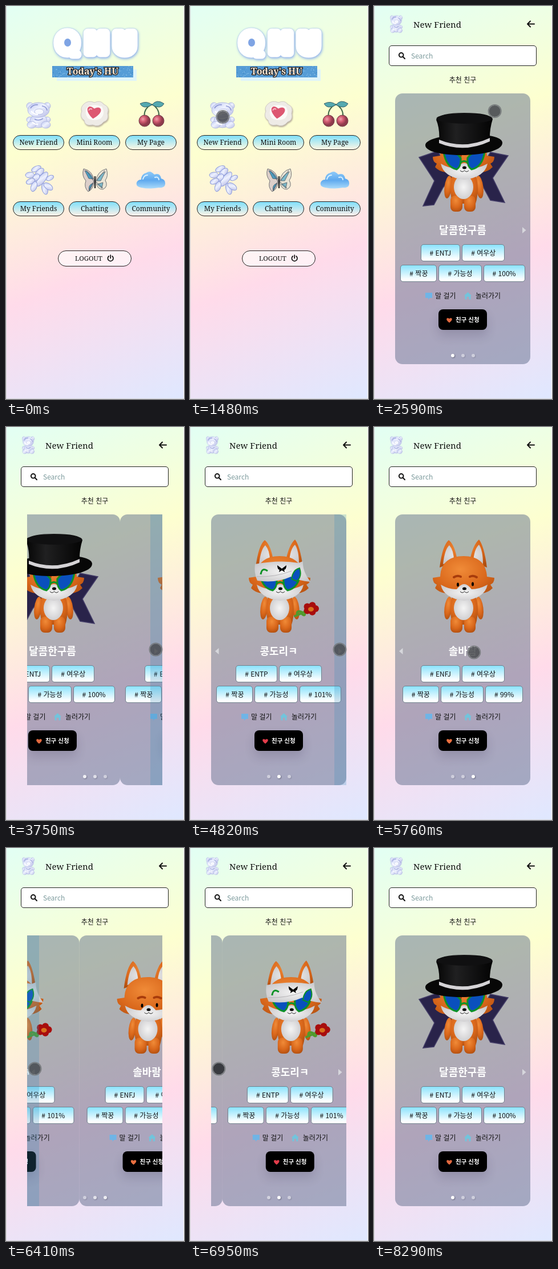
These frames come from a looping animation (312x688 px, 8.62 s). An HTML page:

```html
<!DOCTYPE html>
<html lang="ko">
<head>
<meta charset="utf-8">
<style>
html, body { margin: 0; width: 100%; height: 100%; overflow: hidden; background: #fff; }
body { font: 500 12px 'Noto Sans CJK KR', 'Noto Sans CJK', 'Noto Sans', sans-serif; color: #111; }
#stage { position: absolute; left: 0; top: 0; width: 312px; height: 688px; overflow: hidden;
  background: linear-gradient(160deg, #e2fff4, #fdffd0 33%, #ffdbea 66%, #dfe8ff); }
#frame { position: absolute; inset: 0; box-sizing: border-box; border: solid #d9d9dc; border-width: 0 0 1px 1px; box-shadow: inset -1px 0 #fff; }
#stage div, svg { position: absolute; box-sizing: border-box; }
svg { left: 0; top: 0; width: 312px; height: 688px; }
.slab { font-family: 'Noto Serif', serif; }
.pill { width: 90px; height: 26px; border: 1px solid #222; border-radius: 13px; text-align: center; line-height: 24px;
  background: linear-gradient(#80dffa, rgba(255, 250, 240, .5)); }
#search { left: 26px; top: 69px; width: 259px; height: 36px; border: 1px solid #222; border-radius: 5px; background: #fff;
  padding-left: 38px; line-height: 34px; color: #7d9b9d; font-weight: 400; }
#viewport { left: 37px; top: 153px; width: 237px; height: 474px; overflow: hidden; }
#track { left: 0; top: 0; height: 474px; width: 711px; }
.card { top: 0; width: 237px; height: 474px; border-radius: 13px; background: rgba(97, 110, 140, .5); overflow: hidden; }
.card svg { width: 237px; height: 474px; }
.name { top: 222px; width: 100%; line-height: 32px; text-align: center; font-size: 18px; font-weight: 700; color: #fff; }
#stage .row { left: -20px; width: 277px; display: flex; justify-content: center; gap: 3px; }
.row span { box-sizing: border-box; height: 30px; line-height: 28px; padding: 0 15px; border: 1px solid #71828d; border-radius: 5px;
  background: linear-gradient(#8be3fd, #fff 90%); white-space: nowrap; }
.link { top: 344px; line-height: 20px; font-weight: 400; white-space: nowrap; }
.apply { left: 76px; top: 378px; width: 85px; height: 36px; border-radius: 8px; background: #000; color: #fff;
  padding-left: 30px; line-height: 36px; font-size: 10.5px; font-weight: 800; box-shadow: 0 10px 18px rgba(40, 30, 60, .16); white-space: nowrap; }
.zone { top: 0; width: 21px; height: 474px; background: rgba(60, 140, 185, .25); }
.dot { top: 609px; width: 6px; height: 6px; border-radius: 3px; background: #fff; box-shadow: 1px 1px 2px rgba(40, 40, 60, .5); }
#cursor { width: 24px; height: 24px; margin: -12px; border-radius: 12px; border: 2px solid rgba(115, 118, 120, .85); background: rgba(72, 74, 78, .85); background-clip: padding-box; }
#cursor.pressed { background-color: rgba(45, 47, 52, .9); }
.bubble { font: 900 48px Inter, sans-serif; text-anchor: middle; fill: #fff; stroke: #fff; stroke-width: 15; stroke-linejoin: round;
  filter: drop-shadow(0 0 1px #a9c1ee) drop-shadow(1px 2px 2px #8fb2ec); }
</style>
</head>
<body>
<div id="stage">
  <svg style="width:0;height:0">
    <defs>
      <radialGradient id="fur" cx=".45" cy=".3" r=".75"><stop stop-color="#f08b38"/><stop offset=".6" stop-color="#d9671b"/><stop offset="1" stop-color="#b04f10"/></radialGradient>
      <radialGradient id="white" r=".65"><stop stop-color="#f4f4f4"/><stop offset="1" stop-color="#c6c5c8"/></radialGradient>
      <linearGradient id="glass" x2="1" y2="1"><stop stop-color="#b9c2ee"/><stop offset=".45" stop-color="#eef2ff"/><stop offset="1" stop-color="#b4b8e4"/></linearGradient>
      <linearGradient id="hat" x2="1"><stop stop-color="#050505"/><stop offset=".35" stop-color="#202021"/><stop offset="1" stop-color="#030303"/></linearGradient>
      <linearGradient id="sky" y2="1" x2="0"><stop stop-color="#8fcaf8"/><stop offset=".5" stop-color="#5ea9ee"/><stop offset="1" stop-color="#a9dafb"/></linearGradient>
      <radialGradient id="berry" cx=".35" cy=".35"><stop stop-color="#f1a0ab"/><stop offset=".5" stop-color="#d15a70"/><stop offset="1" stop-color="#8e3a4c"/></radialGradient>
    </defs>
    <g id="bear" fill="url(#glass)" stroke="#a9b1de" stroke-width=".8">
      <circle cx="42" cy="175" r="6"/><circle cx="72" cy="175" r="6"/>
      <ellipse cx="42" cy="199" rx="6" ry="5"/><ellipse cx="72" cy="199" rx="6" ry="5"/>
      <ellipse cx="57" cy="201" rx="15" ry="12"/><ellipse cx="57" cy="182" rx="19" ry="13"/>
      <ellipse cx="45" cy="208" rx="8" ry="6"/><ellipse cx="70" cy="208" rx="8" ry="6"/>
      <ellipse cx="58" cy="185" rx="8" ry="5" fill="#f6f8ff"/>
      <path d="M43 179q4-7 13-6M63 175q8 1 9 8M50 198q7 4 15-1" fill="none" stroke="#8e98d4" stroke-width="1.6"/>
      <path d="M44 184q5 6 12 6M46 203q4 5 10 4" fill="none" stroke="#fff" stroke-width="2"/>
    </g>
    <g id="heart"><path d="M0 4.5C-8 -1 -4.500 -6 0 -2.500C4.500 -6 8 -1 0 4.500Z"/></g>
    <g id="fox">
      <g fill="url(#fur)">
        <path d="M115 246Q120 207 131 198Q142 207 146 234ZM168 234Q173 207 184 197Q193 208 198 246Z"/>
        <ellipse cx="130" cy="317" rx="6.500" ry="20" transform="rotate(7 130 317)"/><ellipse cx="185" cy="317" rx="6.500" ry="20" transform="rotate(-7 185 317)"/>
        <path d="M137 296H178Q186 320 178 346H138Q130 320 137 296Z"/>
        <rect x="134" y="332" width="21" height="28" rx="8"/><rect x="158" y="332" width="20" height="28" rx="8"/>
      </g>
      <ellipse cx="157" cy="317" rx="17" ry="21" fill="url(#white)"/>
      <path d="M121 240Q124 214 132 207Q140 216 140 234ZM174 234Q176 213 184 206Q191 216 191 240Z" fill="url(#white)"/>
      <path d="M157 226C184 226 197 240 198 262L211 264Q211 273 204 276L208 282Q200 290 190 291Q176 303 157 303Q138 303 125 291Q113 289 107 282L110 276Q103 273 103 264L116 262C117 240 130 226 157 226Z" fill="url(#fur)"/>
      <path d="M117 276Q133 285 145 284Q152 275 158 275Q164 275 171 284Q184 284 199 276Q194 300 158 304Q122 300 117 276Z" fill="url(#white)"/>
      <path d="M140 263q6-4 12-1M168 262q6-3 12 1" stroke="#a83c0c" stroke-width="4" stroke-linecap="round" fill="none"/>
      <ellipse cx="147" cy="276" rx="2" ry="3.500"/><ellipse cx="173" cy="275" rx="2" ry="3.500"/>
      <ellipse cx="158.500" cy="283" rx="3.500" ry="2.500"/>
      <path d="M151 288q4 4 7.500 0q4 4 7.500 0" fill="none" stroke="#222"/>
    </g>
    <g id="shades" fill="#0a50bd" stroke="#0c9226" stroke-width="3" stroke-linejoin="round">
      <path d="M122 255Q140 250 152 266Q153 281 145 286Q126 282 122 255ZM194 255Q176 250 164 266Q163 281 171 286Q190 282 194 255Z"/>
      <path d="M152 274q6-5 12 0" fill="none"/>
    </g>
  </svg>

  <div id="home" style="inset:0">
    <svg>
      <text class="bubble" x="108" y="82">Q</text><text class="bubble" x="159" y="82">H</text><text class="bubble" x="208" y="82">U</text>
      <ellipse cx="108" cy="64" rx="6" ry="7" fill="#7fa4e4"/>
      <rect x="89" y="111" width="140" height="20" fill="#dff4fa"/>
      <rect x="81" y="105" width="142" height="20" fill="#559cd6"/>
      <g id="glitter"></g>
      <text x="152" y="120" text-anchor="middle" font-family="Noto Serif, serif" font-weight="900" font-size="16" fill="#f8ead9" stroke="#1d1a1a" stroke-width="2.500" paint-order="stroke">Today's HU</text>
      <use href="#bear"/>
      <g filter="drop-shadow(1px 2px 1px #b9ae9e)">
        <path d="M136 172Q144 164 155 169Q166 164 171 172Q182 176 178 188Q181 200 171 203Q163 213 152 208Q138 211 137 200Q128 194 133 184Q130 178 136 172Z" fill="#eeebe6" stroke="#cfcbc4"/>
        <path d="M142 177Q155 170 168 176Q175 188 166 197Q153 203 143 196Q137 187 142 177Z" fill="#fbfaf7"/>
      </g>
      <use href="#heart" transform="translate(154 186) rotate(8) scale(2.500)" fill="#dd5771"/>
      <path d="M145 183q2-5 6-2" stroke="#f6b3c0" stroke-width="2" fill="none"/>
      <g stroke="#446b4b" stroke-width="2" fill="none"><path d="M256 172Q240 180 243 196M256 172Q270 180 268 196"/></g>
      <path d="M256 173Q247 165 235 171Q241 182 256 173ZM256 173Q264 162 277 171Q271 182 256 173Z" fill="#55a9b0" stroke="#37606a"/>
      <circle cx="243" cy="201" r="10" fill="url(#berry)" stroke="#74404a"/><circle cx="267" cy="201" r="10" fill="url(#berry)" stroke="#74404a"/>
      <g fill="url(#glass)" stroke="#8f9ddb">
        <ellipse cx="63" cy="303" rx="6" ry="15" transform="rotate(38 63 303)"/>
        <ellipse cx="53" cy="285" rx="9" ry="4.500" transform="rotate(-25 53 285)"/><ellipse cx="59" cy="291" rx="9" ry="5" transform="rotate(-40 59 291)"/>
        <ellipse cx="42" cy="296" rx="8" ry="5"/><ellipse cx="53" cy="300" rx="5" ry="7" transform="rotate(40 53 300)"/>
        <ellipse cx="43" cy="307" rx="8" ry="4.500" transform="rotate(-20 43 307)"/><ellipse cx="49" cy="316" rx="5" ry="9" transform="rotate(20 49 316)"/>
        <ellipse cx="68" cy="320" rx="5" ry="10" transform="rotate(-15 68 320)"/><ellipse cx="74" cy="316" rx="9" ry="5" transform="rotate(35 74 316)"/>
        <ellipse cx="77" cy="301" rx="7" ry="4" transform="rotate(-25 77 301)"/>
      </g>
      <g stroke="#52565d" stroke-width=".8">
        <path d="M155 307Q152 288 136 285Q132 297 140 306Q136 317 144 325Q153 321 155 307Z" fill="#dccfca"/>
        <path d="M157 307Q160 289 176 285Q180 298 174 305Q180 316 170 321Q160 322 157 307Z" fill="#e9e4d5"/>
        <path d="M153 303Q148 291 138 288L145 302ZM146 324Q143 313 153 310Z" fill="#4b9ec4"/>
        <path d="M159 306Q163 296 174 290L166 306ZM160 312L170 309L168 319Z" fill="#7cb9ca"/>
        <path d="M141 288L154 307L145 323M173 288L157 307L170 319" fill="none"/>
        <path d="M156 298V319" stroke="#333" stroke-width="2.500"/>
      </g>
      <path d="M237 318Q227 316 229 309Q231 304 237 304Q237 294 246 292Q253 287 260 295Q270 291 272 302Q280 304 279 312Q278 319 268 318Q252 321 237 318Z" fill="url(#sky)"/>
      <path d="M240 303q2-7 8-7M261 300q6-2 7 4" stroke="#d8f0ff" stroke-width="2" fill="none" stroke-linecap="round"/>
    </svg>
    <div id="menu" class="slab"></div>
    <div class="slab" style="left:91px;top:428px;width:129px;height:28px;border:1px solid #222;border-radius:14px;background:rgba(255,255,255,.6);padding-left:29px;line-height:26px;font-size:11.5px">LOGOUT</div>
    <svg><path d="M180.200 438A4.800 4.800 0 1 0 186.200 438M183.200 436V441.500" fill="none" stroke="#111" stroke-width="1.700" stroke-linecap="round"/></svg>
  </div>

  <div id="friends" style="inset:0">
    <div class="slab" style="left:69px;top:22px;font-size:15px;line-height:21px">New Friend</div>
    <div id="search">Search</div>
    <svg fill="none" stroke="#111" stroke-width="2" stroke-linecap="round" stroke-linejoin="round">
      <use href="#bear" transform="translate(28 16) scale(.5 .67) translate(-35 -168)"/>
      <path d="M281 31.500H269M274 26.500L269 31.500L274 36.500"/><circle cx="47.700" cy="85.800" r="3.800"/><path d="M50.800 89L54 92.200"/>
    </svg>
    <div style="top:119px;width:311px;line-height:20px;text-align:center">추천 친구</div>
    <div id="viewport">
      <div id="track"></div>
      <div id="zonePrev" class="zone" style="left:0"></div><div id="zoneNext" class="zone" style="right:0"></div>
    </div>
    <svg fill="#e3e5e8" fill-opacity=".75"><path id="prev" d="M50.500 387V398L44 392.500Z"/><path id="next" d="M260 387V398L266.500 392.500Z"/></svg>
    <div class="dot" style="left:134.500px"></div><div class="dot" style="left:152.500px"></div><div class="dot" style="left:170.500px"></div>
  </div>
  <div id="frame"></div>
  <div id="cursor"></div>
</div>
<script>
const LOOP = 8620, CARD = 237, SLIDE = 400;
const $ = id => document.getElementById(id);

$('menu').innerHTML = ['New Friend', 'Mini Room', 'My Page', 'My Friends', 'Chatting', 'Community']
  .map((label, i) => `<div class="pill" style="left:${[12, 110, 209][i % 3]}px;top:${i < 3 ? 226 : 342}px">${label}</div>`).join('');

const noise = n => Math.abs(Math.sin(n * 127.1) * 43758.5) % 1;
$('glitter').innerHTML = Array.from({ length: 170 }, (_, i) =>
  `<rect x="${81 + noise(i + 1) * 141}" y="${105 + noise(i + 301) * 19}" width="1" height="1" fill="${i % 3 ? '#a5d4f2' : '#2f78b8'}"/>`).join('');

const cape = `<g fill="#29234a" stroke="#443d68" stroke-width="1.500">
  <path d="M79 265L111 254L140 296L121 318L105 348L86 350L106 306Z"/><path d="M204 256L235 262L208 301L229 344L204 340L180 296Z"/></g>`;
const hat = `<path d="M90 244C88 222 224 216 225 239C227 267 91 268 90 244Z" fill="#070707"/>
  <path d="M109 199Q114 187 158 187Q203 187 208 198Q202 217 203 238Q158 258 114 240Q116 216 109 199Z" fill="url(#hat)"/>
  <ellipse cx="158.500" cy="197" rx="49" ry="9" fill="#101011"/>
  <path d="M114 234Q158 252 203 231V237Q158 258 114 240Z" fill="#d5d3d6"/>`;
const bandana = `<path d="M114 240Q158 232 190 238L198 235Q197 253 211 271Q190 269 177 262Q150 274 118 269Q112 257 114 240Z" fill="url(#white)"/>
  <path d="M117 262Q150 263 178 252" stroke="#b5b3b6" fill="none"/>
  <path d="M178 266Q180 250 192 247Q197 262 187 270Z" fill="#0a50bd" stroke="#0c9226" stroke-width="2"/>
  <path d="M124 258Q126 245 136 252" fill="none" stroke="#0c9226" stroke-width="3"/>
  <path d="M161 248L153 242Q153 249 157 250L156 254L161 251L166 254L165 250Q169 249 169 242Z"/>`;
const flower = `<path d="M184 331Q196 326 208 320M188 329q-2-9 8-5M195 326q8 8 6-3" stroke="#4f9a2c" stroke-width="4" fill="none" stroke-linecap="round"/>
  <g fill="#a80d0d">${[0, 1, 2, 3, 4].map(k => `<circle cx="${212 + 8 * Math.cos(k * 1.257)}" cy="${318 + 6 * Math.sin(k * 1.257)}" r="6"/>`).join('')}</g>
  <ellipse cx="212" cy="319" rx="5" ry="4" fill="#d8701c"/>`;
const fox = '<use href="#fox"/>', shades = '<use href="#shades"/>';

const cards = [
  { name: '달콤한구름', type: 'ENTJ', score: '100%', heart: '#e2693f', art: cape + fox + shades + hat },
  { name: '콩도리ㅋ', type: 'ENTP', score: '101%', heart: '#e23c4a', art: fox + shades + bandana + flower },
  { name: '솔바람', type: 'ENFJ', score: '99%', heart: '#ea7040', art: fox },
];
const tags = (top, list) => `<div class="row" style="top:${top}px">${list.map(tag => `<span># ${tag}</span>`).join('')}</div>`;
$('track').innerHTML = cards.map((card, i) => `<div class="card" style="left:${i * CARD}px">
  <svg viewBox="37 153 237 474">${card.art}</svg>
  <div class="name">${card.name}</div>
  ${tags(264, [card.type, '여우상'])}${tags(300, ['짝꿍', '가능성', card.score])}
  <div class="link" style="left:70px">말 걸기</div><div class="link" style="left:141px">놀러가기</div>
  <div class="apply">친구 신청</div>
  <svg viewBox="37 153 237 474"><path d="M90 502H102V511H98L95 514V511H90Z" fill="#6fb4e6"/>
    <path d="M158 507L164.500 501L171 507H169.500V513.500H166.500V509H162.500V513.500H159.500V507Z" fill="#72c4dc"/>
    <use href="#heart" x="132" y="550" fill="${card.heart}"/></svg>
</div>`).join('');

// time, x, y of the touch point
const path = [[930, 19, 289], [1200, 34, 245], [1480, 57.5, 194], [2270, 57.5, 194], [2590, 211.5, 183.5], [2850, 257, 300],
  [3130, 266, 376], [3260, 262.5, 389.5], [5430, 262.5, 389.5], [5800, 165, 395], [6130, 50.5, 386.5], [7830, 50.5, 386.5], [8290, 282, 700]];
// start, from card, to card
const slides = [[3668, 0, 1], [4995, 1, 2], [6315, 2, 1], [6914, 1, 0]];
const OPEN = 1870;

// CSS "ease": cubic-bezier(.25, .1, .25, 1)
function ease(x) {
  const bezier = (s, a, b) => 3 * s * (1 - s) ** 2 * a + 3 * s * s * (1 - s) * b + s ** 3;
  let low = 0, high = 1;
  for (let i = 0; i < 20; i++) {
    const mid = (low + high) / 2;
    if (bezier(mid, .25, .25) < x) low = mid; else high = mid;
  }
  return bezier(low, .1, 1);
}

function pointAt(t) {
  const i = path.findIndex(key => key[0] > t);
  if (i < 1) return null;
  const [t0, x0, y0] = path[i - 1], [t1, x1, y1] = path[i], u = (t - t0) / (t1 - t0);
  return [x0 + (x1 - x0) * u, y0 + (y1 - y0) * u];
}

const show = (id, on) => { $(id).style.visibility = on ? 'visible' : 'hidden'; };
const dots = document.querySelectorAll('.dot');

function draw(t) {
  $('home').style.display = t < OPEN ? '' : 'none';
  $('friends').style.display = t < OPEN ? 'none' : '';

  let position = 0, target = 0;
  for (const [start, from, to] of slides) if (t >= start) {
    position = from + (to - from) * ease(Math.min(1, (t - start) / SLIDE));
    target = to;
  }
  $('track').style.transform = `translateX(${-position * CARD}px)`;
  dots.forEach((dot, i) => { dot.style.opacity = .45 + .55 * Math.max(0, 1 - Math.abs(position - i)); });
  show('prev', target > 0);
  show('next', target < 2);
  show('zoneNext', t >= slides[0][0] && t < slides[1][0]);
  show('zonePrev', t >= slides[2][0] && t < slides[3][0]);

  const point = pointAt(t);
  show('cursor', point);
  if (point) $('cursor').style.transform = `translate(${point[0]}px, ${point[1]}px)`;
  const pressed = (t >= 1740 && t < 2070) || slides.some(([start]) => t >= start - 130 && t < start + 60);
  $('cursor').className = pressed ? 'pressed' : '';
}

const begin = performance.now();
(function tick() {
  draw((performance.now() - begin) % LOOP);
  requestAnimationFrame(tick);
})();
</script>
</body>
</html>
```
